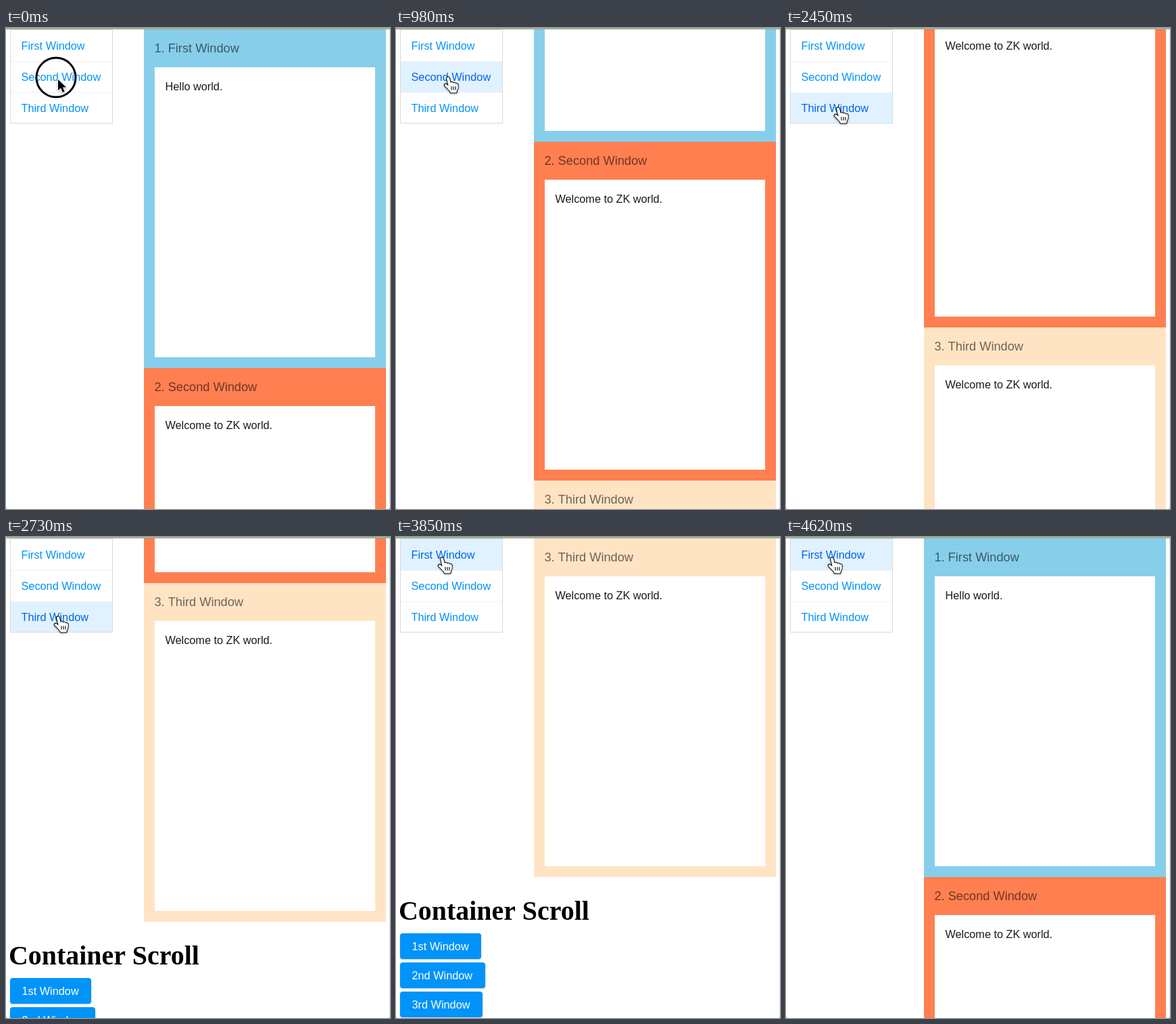
Write an HTML page with a canvas that moves like this. It is 568 px wide and 710 px high and loops after 5.18 s.

```html
<!DOCTYPE html>
<html lang="en">
<head>
<meta charset="utf-8">
<title>Anchor navigation</title>
<style>
  html, body { margin: 0; width: 100%; height: 100%; overflow: hidden; background: #fff; }
  canvas { display: block; width: 568px; height: 710px; }
</style>
</head>
<body>
<canvas id="stage" width="568" height="710"></canvas>
<script>
const W = 568, H = 710, LOOP = 5180, STEP = 70;
const ctx = document.getElementById('stage').getContext('2d');
const SANS = '"Liberation Sans", Arial, sans-serif';
const SERIF = '"Liberation Serif", Times, serif';
const BLUE = '#0093f9', PRESSED = '#0064ed', HOVER = '#e0f2ff';

const panes = [
  { color: '#87ceeb', title: '1. First Window', body: 'Hello world.' },
  { color: '#ff7f50', title: '2. Second Window', body: 'Welcome to ZK world.' },
  { color: '#ffe4c4', title: '3. Third Window', body: 'Welcome to ZK world.' }
];
const links = [
  { label: 'First Window', top: 3, end: 49 },
  { label: 'Second Window', top: 50, end: 95 },
  { label: 'Third Window', top: 96, end: 140 }
];
const buttons = [['1st Window', 120], ['2nd Window', 126], ['3rd Window', 122]];

// start time, distance
const SCROLL_MS = 520;
const scrolls = [[663, 500], [2333, 500], [4082, -1000]];

// press time, row, ring start, ring end
const clicks = [
  [560, 1, 630, 700],
  [2170, 2, 2240, 2380],
  [3850, 0, 3920, 4130]
];

// time, x, y of the fingertip
const path = [
  [0, 77, 76], [140, 77, 76], [210, 73, 75], [280, 73, 75], [350, 77, 73],
  [1190, 77, 73], [1330, 77, 84], [1470, 77, 106], [1540, 78, 111],
  [1680, 90, 116], [1750, 85, 119], [1820, 73, 119], [1890, 77, 118],
  [3080, 77, 118], [3220, 74, 92], [3360, 70, 51], [3500, 68, 31], [LOOP, 68, 31]
];

function rect(x, y, w, h, color) {
  ctx.fillStyle = color;
  ctx.fillRect(x, y, w, h);
}

function text(str, x, y, size, color, family = SANS, weight = 'normal') {
  ctx.font = `${weight} ${size}px ${family}`;
  ctx.fillStyle = color;
  ctx.fillText(str, x, y);
}

function swing(p) {
  p = Math.min(1, Math.max(0, p));
  return 0.5 - Math.cos(Math.PI * p) / 2;
}

function scrollAt(t) {
  return Math.round(scrolls.reduce((sum, [start, dist]) =>
    sum + dist * swing((t - start) / SCROLL_MS), 0));
}

function cursorAt(t) {
  const i = Math.max(1, path.findIndex(p => p[0] >= t));
  const [t0, x0, y0] = path[i - 1], [t1, x1, y1] = path[i];
  const k = (t - t0) / (t1 - t0);
  return { x: Math.round(x0 + (x1 - x0) * k), y: Math.round(y0 + (y1 - y0) * k) };
}

function drawPage(scroll) {
  ctx.save();
  ctx.beginPath();
  ctx.rect(0, 2, W, H - 2);
  ctx.clip();
  ctx.translate(0, -scroll);
  panes.forEach((pane, i) => {
    const y = 2 + 500 * i;
    rect(204, y, 358, 500, pane.color);
    rect(220, y + 56, 326, 428, '#fff');
    text(pane.title, 219.5, y + 34, 18.2, 'rgba(0,0,0,0.57)');
    text(pane.body, 235.5, y + 90, 16.25, 'rgba(0,0,0,0.9)');
  });
  text('Container Scroll', 4, 1565, 39.9, '#000', SERIF, 'bold');
  buttons.forEach(([label, w], i) => {
    const y = 1585 + 43 * i;
    ctx.save();
    ctx.shadowColor = 'rgba(0,0,0,0.2)';
    ctx.shadowBlur = 3;
    ctx.shadowOffsetY = 1;
    ctx.fillStyle = BLUE;
    ctx.beginPath();
    ctx.roundRect(6, y, w, 38, 4);
    ctx.fill();
    ctx.restore();
    text(label, 23.5, y + 25, 16.3, '#fff');
  });
  ctx.restore();
}

function drawMenu(hover, pressed) {
  rect(6, 2, 152, 139, '#d9d9d9');
  rect(7, 3, 150, 137, '#fff');
  rect(7, 49, 150, 1, '#f2f2f2');
  rect(7, 95, 150, 1, '#f2f2f2');
  links.forEach(({ label, top, end }, i) => {
    if (i === hover) rect(7, top, 150, end - top, HOVER);
    const color = i === hover && i === pressed ? PRESSED : BLUE;
    text(label, 22.5, 32 + 46 * i, 16.3, color);
  });
}

function drawFrame() {
  rect(0, 0, W, 1, '#a9c59d');
  rect(0, 1, W, 1, '#8f9f89');
  rect(567, 2, 1, H - 2, '#e2e2e2');
  rect(0, H - 1, 1, 1, '#555');
  rect(W - 1, H - 1, 1, 1, '#555');
}

function drawRing(x, y, alpha) {
  ctx.globalAlpha = alpha;
  ctx.strokeStyle = '#000';
  ctx.lineWidth = 3;
  ctx.beginPath();
  ctx.arc(x - 3, y - 3, 29, 0, Math.PI * 2);
  ctx.stroke();
  ctx.globalAlpha = 1;
}

function paintCursor(shape, fill, line, width) {
  ctx.save();
  ctx.shadowColor = 'rgba(0,0,0,0.35)';
  ctx.shadowBlur = 3;
  ctx.shadowOffsetY = 1;
  ctx.lineJoin = 'round';
  ctx.lineWidth = width;
  ctx.strokeStyle = line;
  ctx.stroke(shape);
  ctx.restore();
  ctx.fillStyle = fill;
  ctx.fill(shape);
}

const arrow = new Path2D('M0 0V16L4 12.5L6.7 19L9.7 17.7L7 11.5H12Z');
const hand = new Path2D(
  'M-2 1.5C-2.3 -.7 1.4 -1.3 2 1L3.8 8C4.5 6.4 7.3 6.6 7.7 8.6' +
  'C8.7 7.3 11 7.7 11.3 9.6C12.6 8.6 14.6 9.2 14.7 11.2' +
  'C15 15 14.4 17 13 19.5L12.4 22.5H3.6L2.8 20.2' +
  'C.8 18.2 -1.5 15.4 -4.8 12.4C-6.2 10.5 -4 8.8 -2.2 10.2L.6 12.4Z');
const creases = new Path2D('M4.8 13.3L5.2 18.5M7.9 13.2L8.2 18.5M10.9 13.2L11.1 18.5');

function drawCursor({ x, y }, pointing) {
  ctx.save();
  ctx.translate(x, y);
  if (pointing) {
    paintCursor(hand, '#fff', '#000', 2);
    ctx.strokeStyle = '#000';
    ctx.lineWidth = 1.1;
    ctx.stroke(creases);
  } else {
    paintCursor(arrow, '#000', '#fff', 2);
  }
  ctx.restore();
}

function render(t) {
  const pos = cursorAt(t);
  const over = t >= 210;
  const hover = over ? links.findIndex(l => pos.y <= l.end) : -1;
  const last = clicks.filter(c => t >= c[0]).pop();

  rect(0, 0, W, H, '#fff');
  drawPage(scrollAt(t));
  drawMenu(hover, last ? last[1] : -1);
  drawFrame();
  if (t < 140) drawRing(pos.x, pos.y, t < 70 ? 1 : 0.5);
  else if (last && t >= last[2] && t < last[3]) drawRing(pos.x, pos.y, 1);
  drawCursor(pos, over);
}

const begin = performance.now();
function tick() {
  const t = (performance.now() - begin) % LOOP;
  render(Math.floor(t / STEP) * STEP);
  requestAnimationFrame(tick);
}
tick();
</script>
</body>
</html>
```
